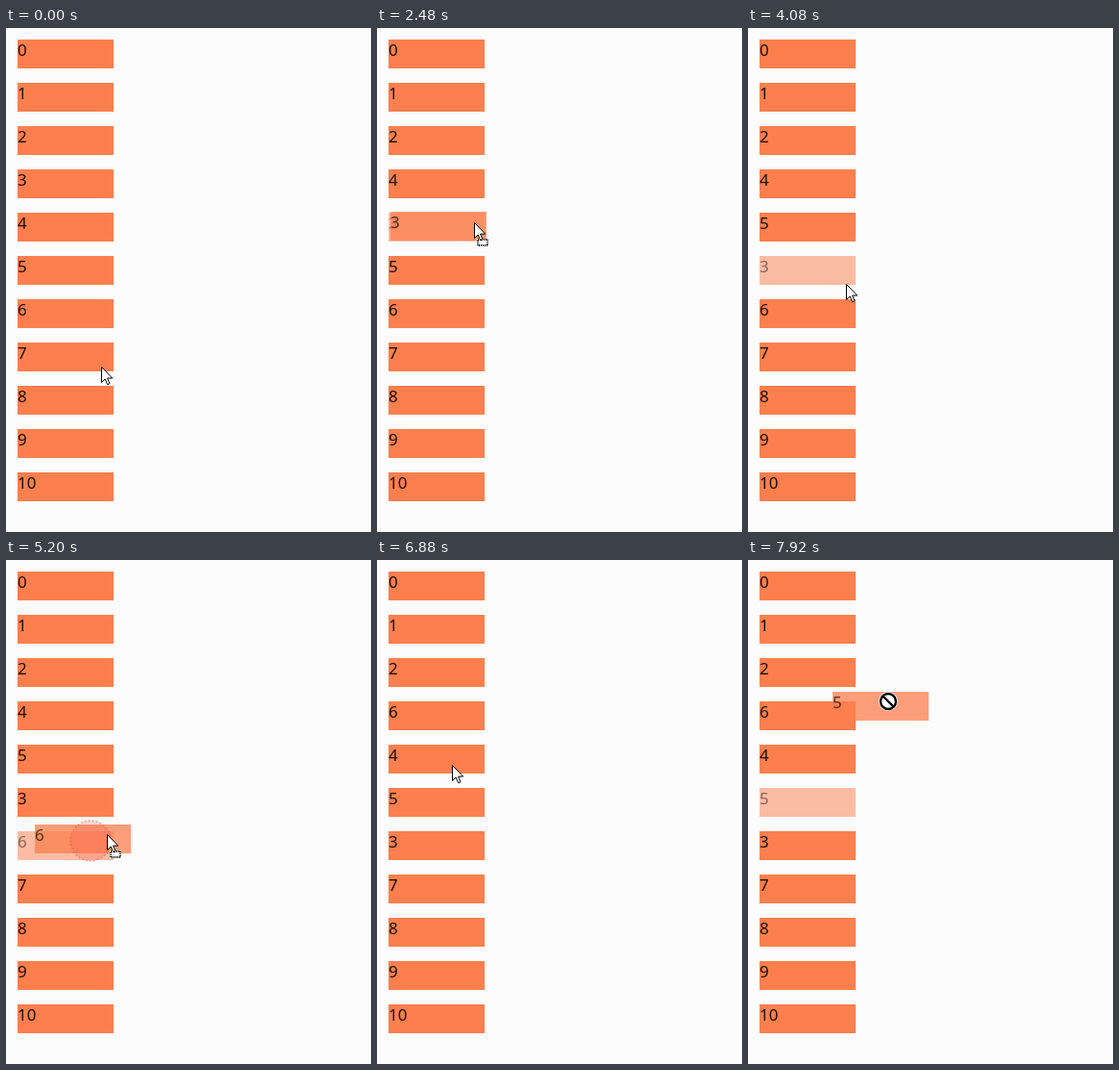
These frames come from a looping animation (380 by 524 pixels, 8 s). An HTML page with a canvas:

```html
<!DOCTYPE html>
<html lang="en">
<head>
<meta charset="utf-8">
<title>Sortable list</title>
<style>
  html, body { margin: 0; width: 100%; height: 100%; overflow: hidden; background: #fcfcfc; }
  canvas { display: block; }
</style>
</head>
<body>
<canvas id="stage" width="380" height="524"></canvas>
<script>
const ctx = document.getElementById('stage').getContext('2d');
const LOOP = 8000, STEP = 80, RIPPLE = 480, DRAG_DELAY = 160;
const LEFT = 12, WIDTH = 100, HEIGHT = 30, COUNT = 11;
const rowTop = slot => 12 + 45 * slot;

// Pointer strokes: eased from the last position to (x, y), bowed sideways by bend
const home = { x: 99, y: 352 };
const strokes = [
  { start: 0, end: 720, x: 99, y: 158, bend: 35 },
  { start: 1040, end: 1680, x: 101, y: 166, bend: 13 },
  { start: 1680, end: 2400, x: 101, y: 202, bend: 0 },
  { start: 2720, end: 3600, x: 102, y: 247, bend: 14 },
  { start: 4000, end: 4080, x: 102, y: 266, bend: 0 },
  { start: 4080, end: 4640, x: 87, y: 292, bend: 0 },
  { start: 5040, end: 5720, x: 105, y: 163, bend: 25 },
  { start: 6600, end: 7120, x: 69, y: 245, bend: -5.5 },
  { start: 7240, end: 7920, x: 145, y: 145, bend: 35 }
];
const drags = [
  { press: 880, drop: 4080 },
  { press: 4880, drop: 6400 },
  { press: 7120, drop: LOOP }
];

const arrow = new Path2D('M.5 .5V16.5L4.2 13L6.7 18.7L9 17.7L6.6 12.1H11.7Z');
const ease = k => k < .5 ? 4 * k ** 3 : 1 - 4 * (1 - k) ** 3;

function pointerAt(time) {
  let { x, y } = home;
  for (const stroke of strokes) {
    if (time < stroke.start) break;
    const k = Math.min(1, (time - stroke.start) / (stroke.end - stroke.start));
    x += (stroke.x - x) * ease(k) + stroke.bend * Math.sin(Math.PI * k);
    y += (stroke.y - y) * ease(k);
  }
  return { x: Math.round(x), y: Math.round(y) };
}

function slotAt({ x, y }) {
  if (x < LEFT || x >= LEFT + WIDTH) return -1;
  for (let slot = 0; slot < COUNT; slot++) {
    if (y >= rowTop(slot) && y < rowTop(slot) + HEIGHT) return slot;
  }
  return -1;
}

// Replays the drags: a held row takes the place of any row under the pointer
function stateAt(time) {
  const order = Array.from({ length: COUNT }, (_, i) => i);
  let held = null;
  for (const { press, drop } of drags) {
    if (time < press + DRAG_DELAY) break;
    const grip = pointerAt(press);
    const from = slotAt(grip);
    const item = order[from];
    for (let t = press + DRAG_DELAY; t <= time && t < drop; t += STEP) {
      const slot = slotAt(pointerAt(t));
      if (slot < 0) continue;
      order.splice(order.indexOf(item), 1);
      order.splice(slot, 0, item);
    }
    // The row stays pale for one step after the drop
    held = time < drop + STEP
      ? { item, dx: grip.x - LEFT, dy: grip.y - rowTop(from), dragging: time < drop }
      : null;
  }
  return { order, held };
}

function drawRow(label, x, y, alpha) {
  ctx.globalAlpha = alpha;
  ctx.fillStyle = '#fd7f4e';
  ctx.fillRect(x, y, WIDTH, HEIGHT);
  ctx.fillStyle = '#1c0f08';
  ctx.fillText(label, x, y + 17);
  ctx.globalAlpha = 1;
}

function drawRipple({ x, y }, age) {
  ctx.beginPath();
  ctx.arc(x + 1, y, 21 * Math.min(1, age / 320), 0, 2 * Math.PI);
  ctx.fillStyle = 'rgba(235, 70, 60, .2)';
  ctx.fill();
  ctx.setLineDash([2, 2]);
  ctx.lineWidth = 1.5;
  ctx.strokeStyle = 'rgba(240, 90, 80, .55)';
  ctx.stroke();
  ctx.setLineDash([]);
}

function drawArrow({ x, y }, dropBox) {
  ctx.save();
  ctx.translate(x, y);
  ctx.strokeStyle = '#000';
  ctx.fillStyle = '#fff';
  if (dropBox) {
    ctx.fillRect(3, 17, 12, 8);
    ctx.lineWidth = 2;
    ctx.setLineDash([1, 1]);
    ctx.strokeRect(4, 18, 10, 6);
    ctx.setLineDash([]);
  }
  ctx.lineWidth = 1;
  ctx.fill(arrow);
  ctx.stroke(arrow);
  ctx.restore();
}

function drawNoDrop(x, y) {
  ctx.beginPath();
  ctx.arc(x, y, 10, 0, 2 * Math.PI);
  ctx.fillStyle = '#fff';
  ctx.fill();
  ctx.beginPath();
  ctx.arc(x, y, 8, 0, 2 * Math.PI);
  ctx.moveTo(x - 5.5, y - 5.5);
  ctx.lineTo(x + 5.5, y + 5.5);
  ctx.lineWidth = 2.4;
  ctx.strokeStyle = '#000';
  ctx.stroke();
}

function draw(time) {
  const pointer = pointerAt(time);
  const { order, held } = stateAt(time);
  const dragging = Boolean(held && held.dragging);

  ctx.fillStyle = '#fcfcfc';
  ctx.fillRect(0, 0, 380, 524);
  ctx.font = '17px "Noto Sans", sans-serif';
  order.forEach((item, slot) =>
    drawRow(item, LEFT, rowTop(slot), held && held.item === item ? .5 : 1));
  if (dragging) drawRow(held.item, pointer.x - held.dx, pointer.y - held.dy, .75);

  const click = drags.find(d => time >= d.press && time < d.press + RIPPLE);
  if (click) drawRipple(pointerAt(click.press), time - click.press);

  if (dragging && slotAt(pointer) < 0) drawNoDrop(pointer.x + 1, pointer.y + 2);
  else drawArrow(pointer, dragging);
}

function tick() {
  draw(Math.floor(performance.now() % LOOP / STEP) * STEP);
  requestAnimationFrame(tick);
}
tick();
</script>
</body>
</html>
```
